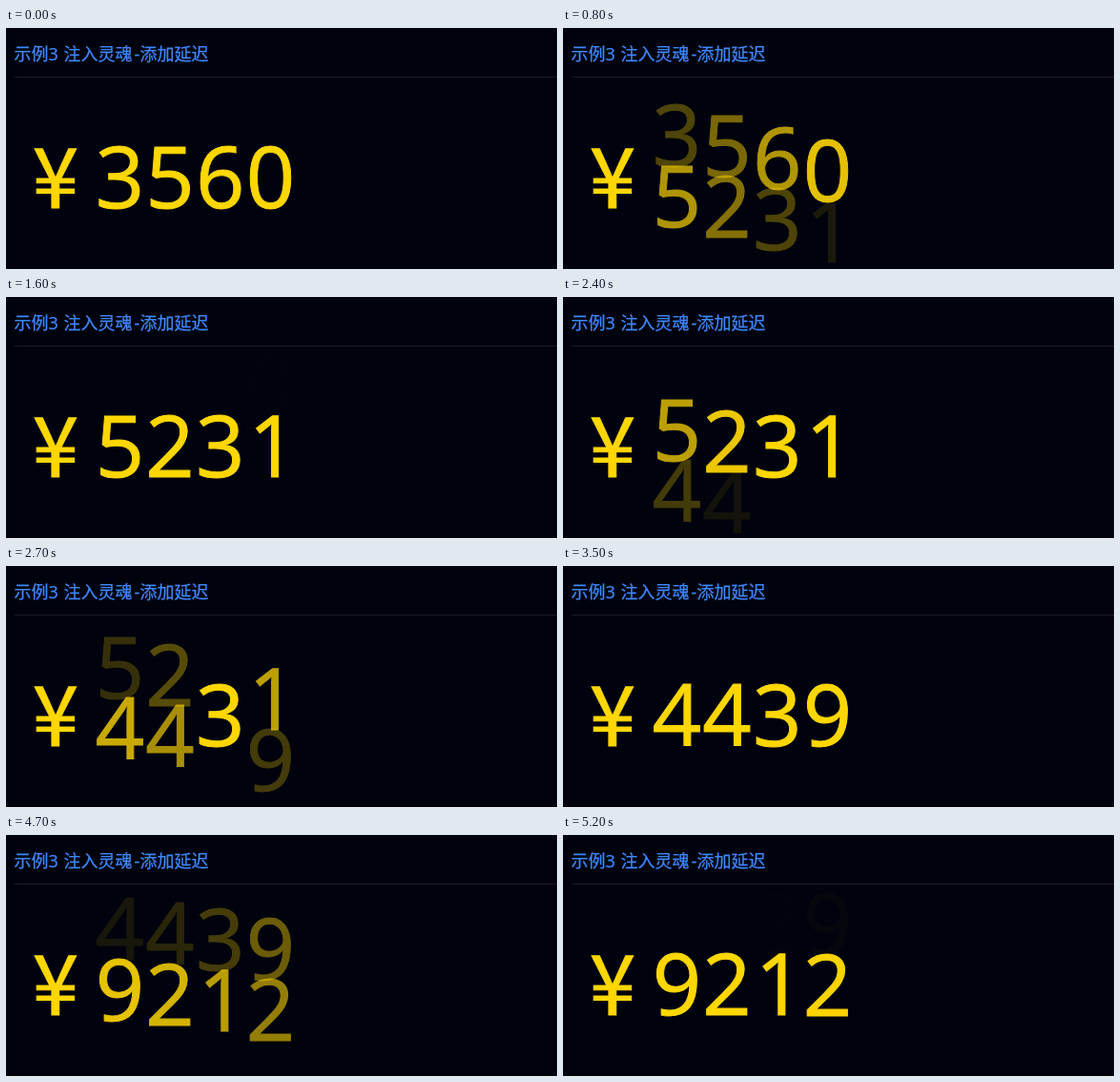
These frames come from a looping animation (578 px wide and 253 px high, 5300 ms). An HTML page with a canvas:

```html
<!DOCTYPE html>
<html lang="zh-CN">
<head>
<meta charset="utf-8">
<title>示例3 注入灵魂-添加延迟</title>
<style>
  html, body { margin: 0; width: 100%; height: 100%; overflow: hidden; background: #00030d; }
  canvas { display: block; width: 578px; height: 253px; }
</style>
</head>
<body>
<canvas id="stage"></canvas>
<script>
const W = 578, H = 253, LOOP = 5300, TICK = 100;
const DURATION = 1000, STAGGER = 100, TRAVEL = 64;
const BASELINE = 189, FIRST_X = 119.4, PITCH = 52.7;
const GOLD = '#ffd700', BLUE = '#3f88ff';
const DIGIT_FONT = '90px "Open Sans", "Noto Sans", sans-serif';
const YEN_FONT = '87px "Noto Sans CJK SC", "Noto Sans CJK", sans-serif';
const TITLE_FONT = '18px "Open Sans", "Noto Sans CJK SC", "Noto Sans CJK", sans-serif';

const values = ['3560', '5231', '4439', '9212'];
const starts = [395, 2215, 4065];

const canvas = document.getElementById('stage');
const ctx = canvas.getContext('2d');
const ratio = window.devicePixelRatio || 1;
canvas.width = W * ratio;
canvas.height = H * ratio;

// CSS "ease": cubic-bezier(.25, .1, .25, 1)
function ease(x) {
  if (x <= 0) return 0;
  if (x >= 1) return 1;
  const bez = (a, b, s) => 3 * a * s * (1 - s) ** 2 + 3 * b * s * s * (1 - s) + s ** 3;
  let lo = 0, hi = 1;
  for (let i = 0; i < 24; i++) {
    const mid = (lo + hi) / 2;
    if (bez(0.25, 0.25, mid) < x) lo = mid; else hi = mid;
  }
  return bez(0.1, 1, lo);
}

// Mixes a colour towards the background, so fill and outline fade as one.
function text(str, x, y, font, color, align, outline) {
  ctx.font = font;
  ctx.fillStyle = ctx.strokeStyle = color;
  ctx.lineWidth = outline;
  ctx.lineJoin = 'miter';
  ctx.miterLimit = 3;
  ctx.textAlign = align;
  ctx.fillText(str, x, y);
  ctx.strokeText(str, x, y);
}

// Digits are drawn opaque on a spare layer, then faded as a whole.
const layer = document.createElement('canvas');
layer.width = canvas.width;
layer.height = canvas.height;
const page = ctx;

function digit(char, col, dy, alpha) {
  if (alpha <= 0) return;
  const nudge = char === '1' ? 2.5 : 0;
  const pen = layer.getContext('2d');
  pen.setTransform(ratio, 0, 0, ratio, 0, 0);
  pen.clearRect(0, 0, W, H);
  pen.font = DIGIT_FONT;
  pen.textAlign = 'center';
  pen.fillStyle = pen.strokeStyle = GOLD;
  pen.lineWidth = 1;
  pen.miterLimit = 3;
  const x = FIRST_X + col * PITCH + nudge, y = BASELINE + dy;
  pen.fillText(char, x, y);
  pen.strokeText(char, x, y);
  page.globalAlpha = alpha;
  page.drawImage(layer, 0, 0, W, H);
  page.globalAlpha = 1;
}

function drawHeader() {
  const title = [['示例3', 8.5], ['注入灵魂', 60.5], ['-', 134.5], ['添加延迟', 140.5]];
  for (const [part, x] of title) text(part, x, 34, TITLE_FONT, BLUE, 'left', 0.25);
  ctx.fillStyle = '#191c25';
  ctx.fillRect(9, 51, W - 9, 1);
}

function drawPrice(time) {
  text('¥', 52, BASELINE, YEN_FONT, GOLD, 'center', 1);
  let step = 0;
  while (step < starts.length - 1 && time >= starts[step + 1]) step++;
  const from = values[step], to = values[step + 1];
  for (let col = 0; col < from.length; col++) {
    if (from[col] === to[col]) {
      digit(to[col], col, 0, 1);
      continue;
    }
    const p = ease((time - starts[step] - col * STAGGER) / DURATION);
    digit(from[col], col, -TRAVEL * p, 1 - p);
    digit(to[col], col, TRAVEL * (1 - p), p);
  }
}

function draw(time) {
  ctx.setTransform(ratio, 0, 0, ratio, 0, 0);
  ctx.fillStyle = '#00030d';
  ctx.fillRect(0, 0, W, H);
  drawHeader();
  drawPrice(time);
  ctx.fillStyle = '#000';
  ctx.fillRect(0, H - 1, W, 1);
}

const origin = performance.now();
function frame() {
  const elapsed = (performance.now() - origin) % LOOP;
  draw(Math.floor(elapsed / TICK) * TICK);
  requestAnimationFrame(frame);
}
frame();
</script>
</body>
</html>
```
